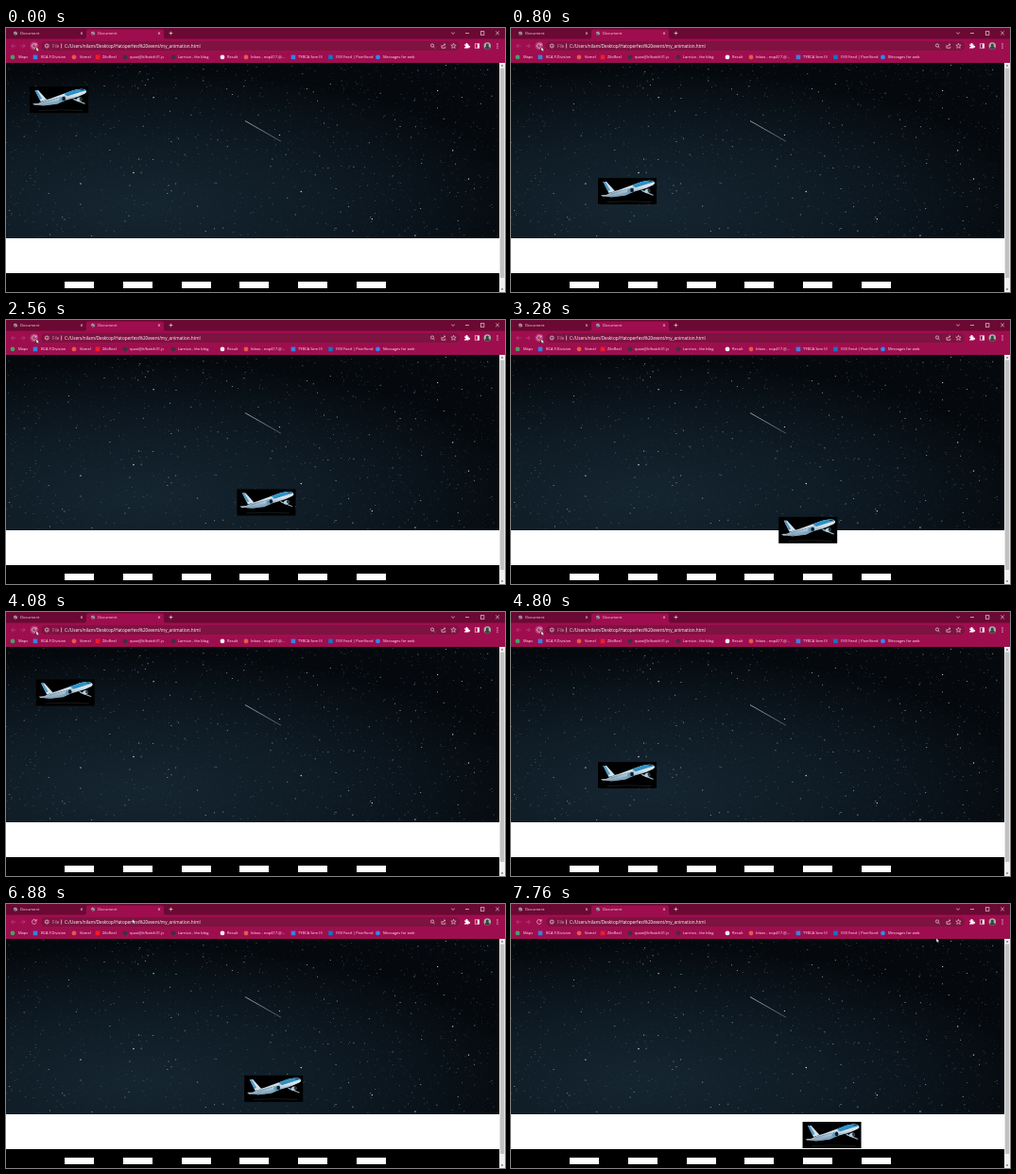
Write an HTML page that moves like this. It is 528 by 280 pixels and loops after 7.84 s.

```html
<!DOCTYPE html>
<html lang="en">
<head>
<meta charset="utf-8">
<title>Night flight</title>
<style>
  html, body { margin: 0; width: 100%; height: 100%; overflow: hidden; background: #000; }
  svg { display: block; width: 528px; height: 280px; }
  text { font-family: "Open Sans", "Noto Sans", sans-serif; font-size: 4.65px; fill: #fff; }
  #tabs text { font-size: 4.2px; fill: #f0dce5; }
  #bookmarks text { font-size: 4px; fill: #fbeaf2; }
  .line { fill: none; stroke: #f0d5e0; stroke-width: .7; }
  .dim { stroke: #b84a7b; }
</style>
</head>
<body>
<svg viewBox="0 0 528 280" xmlns="http://www.w3.org/2000/svg">
  <defs>
    <radialGradient id="sky" cx=".27" cy=".82" r=".78">
      <stop offset="0" stop-color="#152530"/>
      <stop offset=".45" stop-color="#0f1c26"/>
      <stop offset=".8" stop-color="#091118"/>
      <stop offset="1" stop-color="#05090d"/>
    </radialGradient>
    <linearGradient id="meteor" x1="0" y1="0" x2="1" y2="1">
      <stop offset="0" stop-color="#a2a8ad"/>
      <stop offset="1" stop-color="#505c66"/>
    </linearGradient>
    <linearGradient id="hull" x1="0" y1="0" x2=".3" y2="1">
      <stop offset="0" stop-color="#f4fbff"/>
      <stop offset=".55" stop-color="#d3e1ea"/>
      <stop offset="1" stop-color="#6d8fa8"/>
    </linearGradient>
  </defs>

  <!-- page -->
  <rect y="37" width="522" height="186" fill="url(#sky)"/>
  <g id="stars"></g>
  <path d="M253 98.5L291 120.3" stroke="url(#meteor)" stroke-width=".9"/>
  <rect y="223" width="522" height="37" fill="#fff"/>
  <rect y="260" width="522" height="20" fill="#000"/>
  <g id="dashes" fill="#fff"></g>

  <g id="plane">
    <rect width="62" height="28" fill="#000"/>
    <path d="M10 25.5Q32 24 56 25.5" fill="none" stroke="#202427" stroke-width=".7"/>
    <path d="M5.5 4L9 4L18 14L11.5 16Z" fill="#d3e2eb"/>
    <path d="M5.5 4L7.8 4L13 13L10.5 14Z" fill="#4f9cc8"/>
    <path d="M3 18.2L12 17.6L13 19.3L5 19.8Z" fill="#a9c0ce"/>
    <path d="M7 19.2Q13 15 22 12.6L42 5.4Q52 1.6 57.5 2.9Q62 4.8 58.5 7.4Q52 11 43 13.3L22 19.3Q12 21 7 19.2Z" fill="url(#hull)"/>
    <path d="M36 7.6L42 5.4Q52 1.6 57.5 2.9L59.3 4.6Q54 4.6 49 7.2L40 10.2Z" fill="#2b93cb"/>
    <path d="M14 16.8L44 8.2L56 5" fill="none" stroke="#376f8f" stroke-width=".7" stroke-dasharray="1 .6"/>
    <path d="M53.5 3.4L57 3.7" stroke="#17313f" stroke-width=".8"/>
    <path d="M12 20.8L31 15L37 15L29 18.8Z" fill="#7fa6bf"/>
    <path d="M45 12L59 18L58 18.6L47 14.4Z" fill="#9fbccd"/>
    <ellipse cx="34.5" cy="13.6" rx="3.6" ry="2.3" transform="rotate(-18 34.5 13.6)" fill="#5f9bbf"/>
    <ellipse cx="36" cy="13" rx="1.8" ry="2.2" fill="#131c23"/>
    <ellipse cx="52.3" cy="13.8" rx="3" ry="2.1" transform="rotate(-18 52.3 13.8)" fill="#b4cddb"/>
    <ellipse cx="53.9" cy="13.3" rx="1.3" ry="1.8" fill="#222f38"/>
  </g>

  <!-- scrollbar -->
  <rect x="522" y="37" width="6" height="243" fill="#f1f1f1"/>
  <rect x="522.8" y="42.5" width="4.4" height="222.5" fill="#c1c1c1"/>
  <path d="M523.7 40.5L525 38.8L526.3 40.5ZM523.7 276.5L525 278.2L526.3 276.5Z" fill="#555"/>

  <!-- browser frame -->
  <rect width="528" height="37" fill="#9e0e4f"/>
  <path d="M0 0H528V11.5H169Q167 11.5 167 9.5V3.5Q167 1.5 165 1.5H87Q85 1.5 85 3.5V9.5Q85 11.5 83 11.5H0Z" fill="#6a0933"/>
  <rect x="37" y="14" width="443" height="10" rx="5" fill="#7e1240"/>
  <g id="tabs"></g>
  <g class="line">
    <path d="M172.6 5.5H176.4M174.5 3.6V7.4M471.2 4.7L473 6.3L474.8 4.7M486 5.5H490M518.2 3.6L521.8 7.2M521.8 3.6L518.2 7.2"/>
    <rect x="502.3" y="3.7" width="3.6" height="3.6"/>
    <path class="dim" d="M10.5 19H5.8M8 16.8L5.8 19L8 21.2M15.5 19H20.2M18 16.8L20.2 19L18 21.2"/>
    <circle id="hover" cx="29.8" cy="18.8" r="4.4" fill="#ad3a70" stroke="none"/>
    <path d="M31.7 17.6A2.3 2.3 0 1 0 32 19.6M32.2 16.1V18.1H30.2"/>
    <circle cx="43.3" cy="19" r="2"/>
    <path d="M43.3 18.7V20.2M43.3 17.6V18.1M58.6 16.5V21.5"/>
    <circle cx="451" cy="18.5" r="1.6"/>
    <path d="M452.2 19.8L453.6 21.2M461 18V21.2H464.8V19.8M462 19.6Q462.3 17.6 464.8 17.5M463.6 16.3L464.9 17.5L463.6 18.7"/>
    <path d="M473.5 16.3L474.2 18.1L476.2 18.2L474.7 19.5L475.2 21.4L473.5 20.3L471.8 21.4L472.3 19.5L470.8 18.2L472.8 18.1Z" stroke-width=".6"/>
    <rect x="496.3" y="16.8" width="4.4" height="4.4"/>
  </g>
  <g fill="#fff">
    <path d="M485 17.5H486.6A1 1 0 1 1 488.4 17.5H489.6V19A1 1 0 1 1 489.6 20.6V21.5H485V20.2A.9 .9 0 1 0 485 18.8Z"/>
    <rect x="498.8" y="16.8" width="2" height="4.4"/>
    <circle cx="520" cy="16.9" r=".6"/><circle cx="520" cy="19" r=".6"/><circle cx="520" cy="21.1" r=".6"/>
  </g>
  <circle cx="509.3" cy="19" r="3.7" fill="#a9b3a5"/>
  <path d="M506.6 21.5Q507 19.6 508.3 19.2A1.5 1.5 0 1 1 510.3 19.2Q511.7 19.6 512 21.5A3.7 3.7 0 0 1 506.6 21.5Z" fill="#39443f"/>
  <text x="49" y="20.7" style="fill:#c99db2">File</text>
  <text x="62" y="20.7">C:/Users/nilam/Desktop/Hatoperfest%20event/my_animation.html</text>
  <g id="bookmarks"></g>
  <path id="cursor" d="M0 0V4.6L1.1 3.7L1.9 5.3L2.7 4.9L2 3.4H3.3Z" fill="#fff" stroke="#111" stroke-width=".4"/>
</svg>
<script>
const LOOP = 7840, STEP = 80, FLIGHT = 4000, LEAD = 30;
const byId = id => document.getElementById(id);

function add(parent, tag, attrs, label) {
  const node = document.createElementNS("http://www.w3.org/2000/svg", tag);
  for (const key in attrs) node.setAttribute(key, attrs[key]);
  if (label) node.textContent = label;
  return byId(parent).appendChild(node);
}

function random(seed) {
  return () => (seed = (seed * 48271) % 2147483647) / 2147483647;
}

function drawStars() {
  const rnd = random(2024);
  const layers = [[1500, .6, "#33424d"], [420, .8, "#56646d"], [90, 1, "#87929a"], [8, 1.2, "#bcc3c8"]];
  for (const [count, size, fill] of layers) {
    let d = "";
    for (let i = 0; i < count; i++) {
      const x = (rnd() * 520).toFixed(1), y = (37.5 + rnd() * 184).toFixed(1);
      d += `M${x} ${y}h${size}v${size}h${-size}z`;
    }
    add("stars", "path", { d, fill });
  }
  for (const [cx, cy] of [[312.3, 173.5], [135, 153.5]])
    add("stars", "circle", { cx, cy, r: .8, fill: "#c5ccd0" });
}

function drawTabs() {
  for (const x of [10, 92]) {
    add("tabs", "circle", { cx: x, cy: 5.6, r: 2.2, fill: "#7c6d78" });
    add("tabs", "path", { d: `M${x - 1.6} 5Q${x} 3.6 ${x + .6} 5.4T${x + 1.5} 6.4`, class: "line" });
    add("tabs", "text", { x: x + 5, y: 7.1 }, "Document");
    add("tabs", "path", { d: `M${x + 68.9} 4.5l2.2 2.2m0 -2.2l-2.2 2.2`, class: "line" });
  }
}

function drawBookmarks() {
  const items = [
    [7, "#45a163", "Maps", 13], [31, "#3c7fe0", "BCA F.Division", 37, true],
    [72, "#e5584b", "Vomel", 78], [97, "#f01c25", "ZiloReel", 102, true],
    [126, "#41303b", "quxo@lr/batch31.js", 131], [177, "#4a2a3c", "Larnivo - the blog", 182],
    [229, "#f1f1f1", "Result", 234], [254, "#e5584b", "Inbox - nop417.@...", 259],
    [304, "#3c7fe0", "TYBCA Sem III", 309, true], [343.5, "#1673c2", "(93) Feed | PeerVond", 349, true],
    [393.5, "#3387ee", "Messages for web", 399]
  ];
  for (const [x, fill, label, textX, square] of items) {
    if (square) add("bookmarks", "rect", { x: x - 2.3, y: 28.6, width: 4.6, height: 4.6, fill });
    else add("bookmarks", "circle", { cx: x, cy: 30.9, r: 2.4, fill });
    add("bookmarks", "text", { x: textX, y: 32.4 }, label);
  }
}

// Same curve as the CSS "ease" keyword.
function ease(p) {
  let low = 0, high = 1, s = .5;
  for (let i = 0; i < 18; i++) {
    s = (low + high) / 2;
    if (.75 * s * (1 - s) + s ** 3 < p) low = s; else high = s;
  }
  return .3 * s * (1 - s) ** 2 + 3 * s * s * (1 - s) + s ** 3;
}

const mix = (a, b, p) => a + (b - a) * p;
const clamp = v => Math.max(0, Math.min(1, v));
const route = [[24, 60.4], [93.2, 160.8], [186.2, 160.8], [252.5, 182], [310.1, 232.4]];

function planeAt(time) {
  const leg = (time + LEAD) % FLIGHT / FLIGHT * 4;
  const i = Math.floor(leg), p = ease(leg - i);
  return route[i].map((v, axis) => mix(v, route[i + 1][axis], p));
}

function cursorAt(time) {
  const out = clamp((time - 6720) / 480), back = clamp((time - 7200) / 480);
  const p = out * out * (3 - 2 * out);
  return [mix(mix(32, 425, p), 450, back), mix(mix(20, 5, p), 36, back)];
}

const place = (id, [x, y]) => byId(id).setAttribute("transform", `translate(${x.toFixed(2)} ${y.toFixed(2)})`);

function render(now) {
  const time = Math.floor(now % LOOP / STEP) * STEP;
  place("plane", planeAt(time));
  place("cursor", cursorAt(time));
  byId("hover").style.display = time > 6780 ? "none" : "";
}

drawStars();
drawTabs();
drawBookmarks();
for (let i = 0; i < 6; i++)
  add("dashes", "rect", { x: Math.round(62 + i * 61.8), y: 269, width: 31, height: 7 });

const start = performance.now();
function tick() {
  render(performance.now() - start);
  requestAnimationFrame(tick);
}
tick();
</script>
</body>
</html>
```
